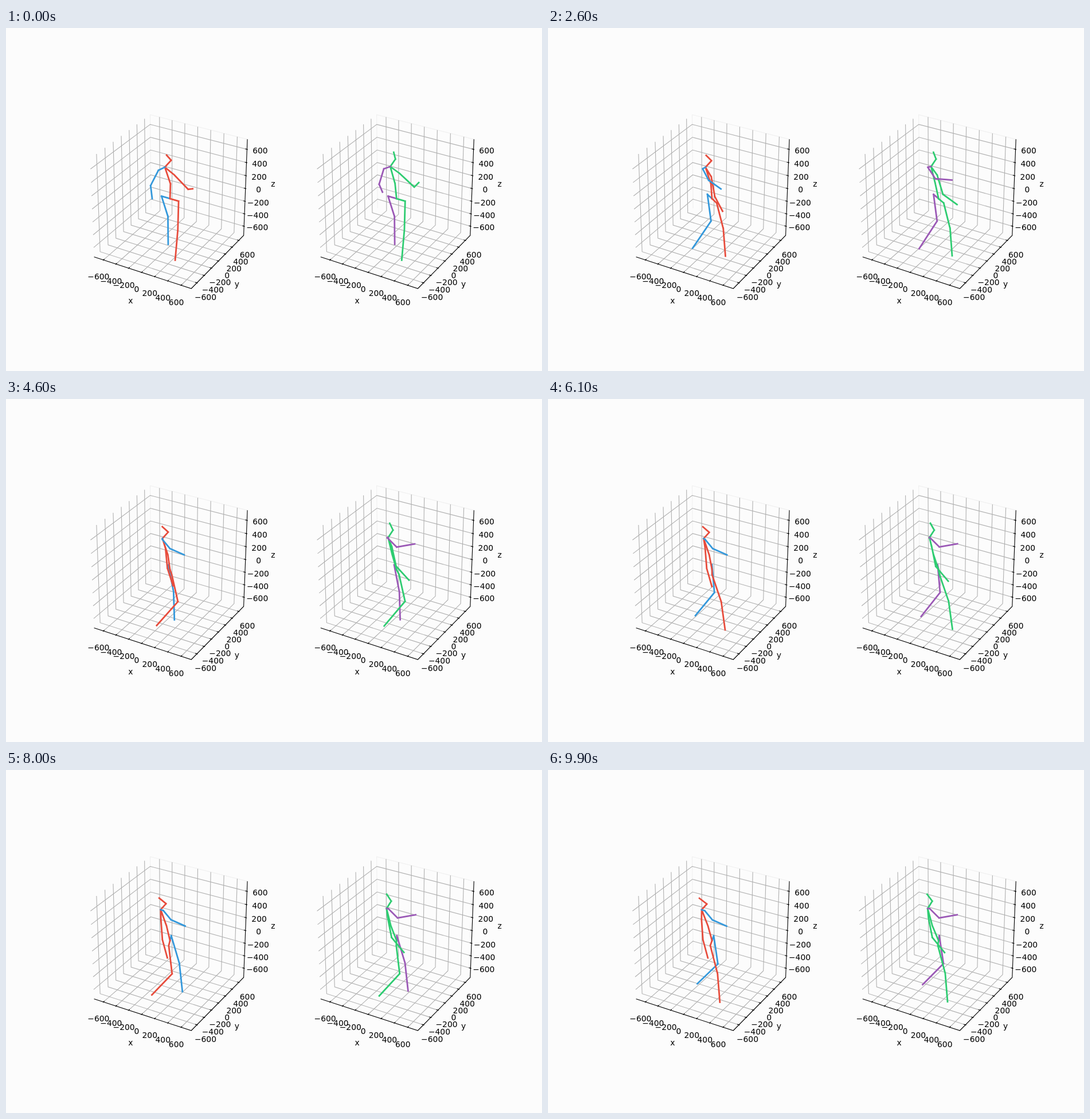
Write an HTML page that moves like this. It is 935 px wide and 599 px high and loops after 10 s.

```html
<!DOCTYPE html>
<html lang="en">
<head>
<meta charset="utf-8">
<title>Walking skeletons</title>
<style>
  html, body { margin: 0; width: 100%; height: 100%; overflow: hidden; background: #fcfcfc; }
  svg { display: block; }
  path { fill: none; }
  text { font: 13.89px "DejaVu Sans", sans-serif; text-anchor: middle; fill: #000; }
</style>
</head>
<body>
<svg id="stage" width="935" height="599" viewBox="0 0 935 599"></svg>
<script>
const stage = document.getElementById("stage");

function add(tag, attrs, content = "") {
  const node = document.createElementNS("http://www.w3.org/2000/svg", tag);
  for (const name in attrs) node.setAttribute(name, attrs[name]);
  node.textContent = content;
  stage.append(node);
  return node;
}

const line = points => "M" + points.map(p => p.map(v => v.toFixed(2)).join(" ")).join("L");
const segments = points => points.slice(1).map((p, i) => line([points[i], p])).join("");
const mix = (a, b, k) => a + (b - a) * k;
const mixPoint = (a, b, k) => a.map((v, axis) => mix(v, b[axis], k));
const plus = (a, b) => a.map((v, axis) => v + b[axis]);
const radians = degrees => degrees * Math.PI / 180;

// ---- Axes: unit cube seen from elevation 30°, azimuth -60°, distance 10 ----
const CENTER_Y = 298, ZOOM = 1958, LIMIT = 1500;
const TICKS = Array.from({ length: 7 }, (_, i) => 200 * i - 600);

function project(cx, [x, y, z]) {
  const depth = 10 - (0.433 * x - 0.75 * y + 0.5 * z);
  return [
    cx + ZOOM * (0.866 * x + 0.5 * y) / depth,
    CENTER_Y - ZOOM * (-0.25 * x + 0.433 * y + 0.866 * z) / depth
  ];
}

function drawAxes(cx) {
  const lo = -0.5, hi = 0.5, out = hi + 0.1 / 12, inner = hi - 0.2 / 12;
  const stroke = (color, ...points) =>
    add("path", { d: line(points.map(p => project(cx, p))), stroke: color, "stroke-width": 1.11 });
  const label = (x, y, text) => add("text", { x, y }, text);

  stroke("#f0f0f0", [lo, hi, lo], [lo, hi, hi], [hi, hi, hi]);

  const axes = [
    { grid: t => [[t, lo, lo], [t, hi, lo], [t, hi, hi]],
      tick: t => [[t, -out, lo], [t, -inner, lo]],
      at: t => [t, lo, lo], shift: [-8.5, 29.3] },
    { grid: t => [[hi, t, lo], [lo, t, lo], [lo, t, hi]],
      tick: t => [[out, t, lo], [inner, t, lo]],
      at: t => [hi, t, lo], shift: [15, 25] },
    { grid: t => [[lo, lo, t], [lo, hi, t], [hi, hi, t]],
      tick: t => [[out, hi, t], [inner, hi, t]],
      at: t => [hi, hi, t], shift: [23, 2] }
  ];
  for (const { grid } of axes)
    for (const value of TICKS) stroke("#b0b0b0", ...grid(value / LIMIT));

  stroke("#000", [lo, lo, lo], [hi, lo, lo], [hi, hi, lo], [hi, hi, hi]);

  for (const { tick, at, shift } of axes)
    for (const value of TICKS) {
      const t = value / LIMIT, [x, y] = project(cx, at(t));
      stroke("#000", ...tick(t));
      label(x + shift[0], y + shift[1] + 5, String(value).replace("-", "\u2212"));
    }

  label(cx - 68.7, 480.8, "x");
  label(cx + 116.8, 451.5, "y");
  label(cx + 179.8, 277, "z");
}

// ---- Walk: body sizes in axis units, arms and head in pixels ----
const STEP = 100, STEPS = 100, STRIDE = 36.4, TOE_OFF = 26;
const HIP = 132, SHOULDER = 122, THIGH = 440, SHIN = 455;

// Thigh and shin angles from the vertical; the cycle starts at toe-off.
function legAngles(cycle) {
  const w = 2 * Math.PI * cycle;
  return [
    0.18 + 0.22 * Math.cos(w - 1.82),
    -0.2 - 0.38 * Math.cos(w) - 0.135 * Math.cos(2 * w - 0.73)
  ];
}

function progress(step) {
  const t = step / (STEPS - 1), r = Math.min(1, step / 36);
  return {
    drift: t,
    turn: 1 - (1 - t) ** 2,
    settle: 1 - Math.exp(-step / 14),
    raise: r * r * (3 - 2 * r)
  };
}

// An arm bone is a [length, angle] pair, the angle taken from straight down.
function arm(shoulder, { from, to }, k) {
  const points = [shoulder];
  from.forEach((bone, i) => {
    const [length, angle] = mixPoint(bone, to[i], k);
    const a = radians(angle);
    points.push(plus(points[i], [length * Math.sin(a), length * Math.cos(a)]));
  });
  return points;
}

function figure(cx, look) {
  const pen = color => add("path", { stroke: color, "stroke-width": 2.78, "stroke-linecap": "square" });
  const [sideLeg, mainBody, sideArm] = [look.side, look.main, look.side].map(pen);

  return step => {
    const { drift, turn, settle, raise } = progress(step);
    const heading = radians(90 - look.turn * turn);
    const ahead = [Math.cos(heading), Math.sin(heading)];
    const place = (forward, leftward, up) => project(cx, [
      forward * ahead[0] - leftward * ahead[1],
      forward * ahead[1] + leftward * ahead[0],
      up
    ].map(v => v / LIMIT));

    const root = place(0, 0, 0);
    const leg = (side, lag) => {
      const [thigh, shin] = legAngles((step - TOE_OFF) / STRIDE + lag);
      const knee = [THIGH * Math.sin(thigh), -THIGH * Math.cos(thigh)];
      const foot = plus(knee, [SHIN * Math.sin(shin), -SHIN * Math.cos(shin)]);
      return [[0, 0], knee, foot].map(([forward, up]) => place(forward, side * HIP, up));
    };

    const [neckShift, noseShift, headShift] =
      [look.neck, look.nose, look.head].map(([a, b]) => mixPoint(a, b, drift));
    const neck = plus(root, neckShift);
    const nose = plus(neck, noseShift);
    const head = plus(nose, headShift);
    const spine = plus(mixPoint(neck, root, 0.53), [mix(...look.bend, turn), 0]);
    const shoulder = side => {
      const [x, y] = place(0, side * SHOULDER, 0);
      return [neck[0] + x - root[0] + 2.5, neck[1] + y - root[1] + look.shoulderDrop];
    };

    sideLeg.setAttribute("d", segments([root, ...leg(1, 0)]));
    mainBody.setAttribute("d",
      segments([root, ...leg(-1, 0.5)]) +
      segments([root, spine, neck, nose, head]) +
      segments([neck, ...arm(shoulder(-1), look.mainArm, settle)]));
    sideArm.setAttribute("d", segments([neck, ...arm(shoulder(1), look.sideArm, raise)]));
  };
}

const LEFT_X = 286.1, RIGHT_X = 681.3;
drawAxes(LEFT_X);
drawAxes(RIGHT_X);

const figures = [
  figure(LEFT_X, {
    side: "#3498db", main: "#e74c3c", turn: 70, bend: [5, 1.5], shoulderDrop: 9.5,
    neck: [[-9, -55], [-18, -54]],
    nose: [[11, -12], [9, -10]],
    head: [[-8, -9], [-13, -10]],
    mainArm: { from: [[35, 44], [8, 97]], to: [[35, 4], [33, 15]] },
    sideArm: { from: [[30, -27], [23, 7]], to: [[21, 40], [27, 66]] }
  }),
  figure(RIGHT_X, {
    side: "#9b59b6", main: "#2ecc71", turn: 64, bend: [2.5, -2], shoulderDrop: 8,
    neck: [[-11, -56], [-19, -56]],
    nose: [[9, -13], [8, -13]],
    head: [[-3, -12], [-9, -12]],
    mainArm: { from: [[35, 47], [11, 135]], to: [[35, 11], [34, 39]] },
    sideArm: { from: [[28, -17], [15, 23]], to: [[23, 45], [32, 100]] }
  })
];

let start = null, shown = -1;
function render(now) {
  if (start === null) start = now;
  const step = Math.floor((now - start) / STEP) % STEPS;
  if (step !== shown) {
    figures.forEach(draw => draw(step));
    shown = step;
  }
  requestAnimationFrame(render);
}
figures.forEach(draw => draw(0));
requestAnimationFrame(render);
</script>
</body>
</html>
```
